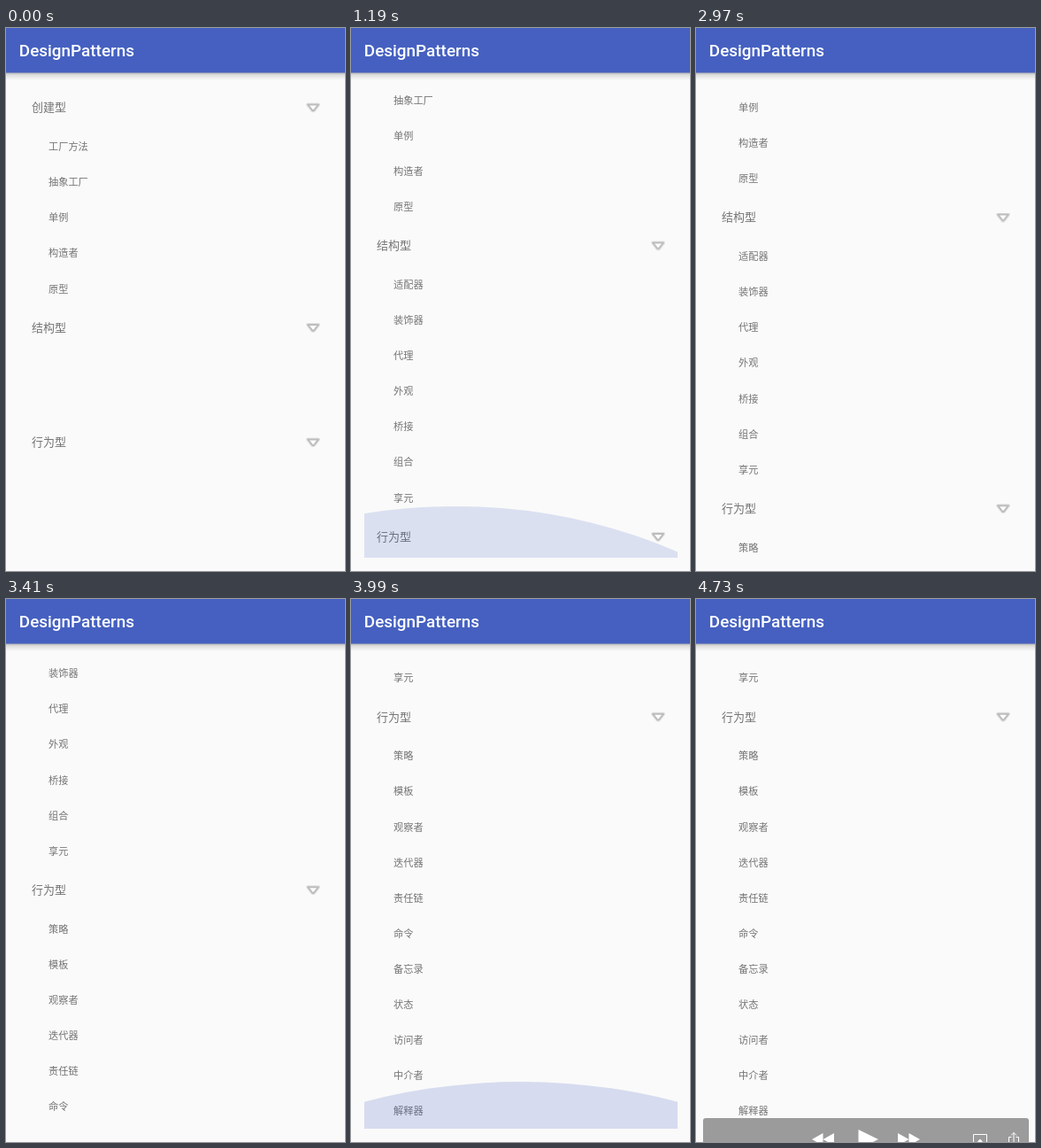
An HTML page that plays this animation: 383 by 613 pixels, repeating every 5.33 s.

```html
<!DOCTYPE html>
<html lang="zh-CN">
<head>
<meta charset="utf-8">
<title>DesignPatterns</title>
<style>
html, body { margin: 0; width: 100%; height: 100%; overflow: hidden; background: #fafafa; }
svg { display: block; width: 383px; height: 613px; }
text { font-family: "Noto Sans CJK SC", "Noto Sans CJK", "Noto Sans", sans-serif; fill: #747474; }
.head { font-size: 13px; }
.item { font-size: 11.2px; }
.title { font: 500 18.9px Roboto, sans-serif; fill: #fff; }

#list, #last, .late, #glow, #player { animation: 5330ms step-end infinite; }
#list { animation-name: scroll; }
#last { animation-name: expand; }
.late { animation-name: reveal; }
#glow { animation-name: glow; }
#player { animation-name: player; }

@keyframes scroll {
  0% { transform: translateY(0); }
  11.25% { transform: translateY(-68px); }
  14.07% { transform: translateY(-92px); }
  16.69% { transform: translateY(-92.6px); }
  55.72% { transform: translateY(-124.5px); }
  58.53% { transform: translateY(-165px); }
  61.16% { transform: translateY(-231px); }
  63.97% { transform: translateY(-338.5px); }
  66.6% { transform: translateY(-430px); }
  69.41% { transform: translateY(-515px); }
  72.23% { transform: translateY(-532px); }
  74.85%, 100% { transform: translateY(-533.9px); }
}
@keyframes expand {
  0% { transform: translateY(-199.3px); }
  2.81%, 100% { transform: translateY(0); }
}
@keyframes reveal {
  0% { visibility: hidden; }
  5.62%, 100% { visibility: visible; }
}
@keyframes glow {
  0% { transform: translate(118px, 598px) scale(1, 0); opacity: 0; }
  19.51% { transform: translate(118px, 598px) scale(1, .76); opacity: .06; }
  22.32% { transform: translate(118px, 598px) scale(1, .817); opacity: .17; }
  24.95% { transform: translate(118px, 598px) scale(1, .437); opacity: .1; }
  27.76% { transform: translate(118px, 598px) scale(1, .197); opacity: .04; }
  55.72% { transform: translate(192px, 598px) scale(1, 0); opacity: 0; }
  74.85% { transform: translate(192px, 598px) scale(1, .746); opacity: .2; }
  77.67% { transform: translate(192px, 598px) scale(1, .366); opacity: .08; }
  80.48%, 100% { transform: translate(192px, 598px) scale(1, 0); opacity: 0; }
}
@keyframes player {
  0% { opacity: 0; }
  86.11% { opacity: .5; }
  88.74%, 100% { opacity: 1; }
}
</style>
</head>
<body>
<svg viewBox="0 0 383 613">
  <defs>
    <clipPath id="view"><rect x="15" y="65" width="354" height="533"/></clipPath>
    <linearGradient id="shade" x2="0" y2="1">
      <stop offset="0" stop-color="#000" stop-opacity=".3"/>
      <stop offset=".35" stop-color="#000" stop-opacity=".11"/>
      <stop offset="1" stop-color="#000" stop-opacity="0"/>
    </linearGradient>
    <g id="arrow" stroke-linejoin="round">
      <path d="M341 -3H353L348 3.4Q347 4.2 346 3.4Z" fill="none" stroke="#000" stroke-opacity=".09" stroke-width="4"/>
      <path d="M341 -3H353L348 3.4Q347 4.2 346 3.4Z" fill="#fdfdfd" stroke="#bdbdbd" stroke-width="2"/>
    </g>
  </defs>
  <rect width="383" height="613" fill="#fafafa"/>

  <g clip-path="url(#view)">
    <g id="list"></g>
    <g id="glow"><circle cy="460" r="531" fill="#4560c0"/></g>
  </g>

  <rect y="50" width="383" height="9" fill="url(#shade)"/>
  <rect width="383" height="50.5" fill="#4560c0"/>
  <text class="title" x="14.8" y="32">DesignPatterns</text>

  <g id="player">
    <rect x="8" y="586" width="368" height="40" rx="3" fill="#9b9b9b"/>
    <path fill="#fff" d="M131 610L143.5 603V617ZM143.5 610L156 603V617ZM183.500 599L206 610L183.500 621ZM228 603L240.500 610L228 617ZM240.500 603L253 610L240.500 617ZM321 609.500L326 615H316Z"/>
    <path fill="none" stroke="#fff" d="M316 613.500H313.500V604.500H328.500V613.500H326M356.500 607.500H353.500V618H364.500V607.500H361.500M359 613V602.500M356 605.500L359 602.500L362 605.500"/>
  </g>
</svg>
<script>
const NS = "http://www.w3.org/2000/svg";
const groups = [
  ["创建型", "工厂方法 抽象工厂 单例 构造者 原型"],
  ["结构型", "适配器 装饰器 代理 外观 桥接 组合 享元"],
  ["行为型", "策略 模板 观察者 迭代器 责任链 命令 备忘录 状态 访问者 中介者 解释器"]
];
const PITCH = 40.1, HEAD_GAP = 44.3, TAIL_GAP = 43.8;

function add(parent, tag, attrs, label = "") {
  const el = document.createElementNS(NS, tag);
  for (const key in attrs) el.setAttribute(key, attrs[key]);
  el.textContent = label;
  return parent.appendChild(el);
}

const list = document.getElementById("list");
let y = 89.5;
groups.forEach(([name, items], i) => {
  const group = add(list, "g", i === 2 ? { id: "last" } : {});
  add(group, "text", { class: "head", x: 29, y: y + 4.9 }, name);
  add(group, "use", { href: "#arrow", y });
  const children = add(group, "g", i ? { class: "late" } : {});
  y += HEAD_GAP;
  for (const item of items.split(" ")) {
    add(children, "text", { class: "item", x: 48, y: y + 4.3 }, item);
    y += PITCH;
  }
  y += TAIL_GAP - PITCH;
});
</script>
</body>
</html>
```
